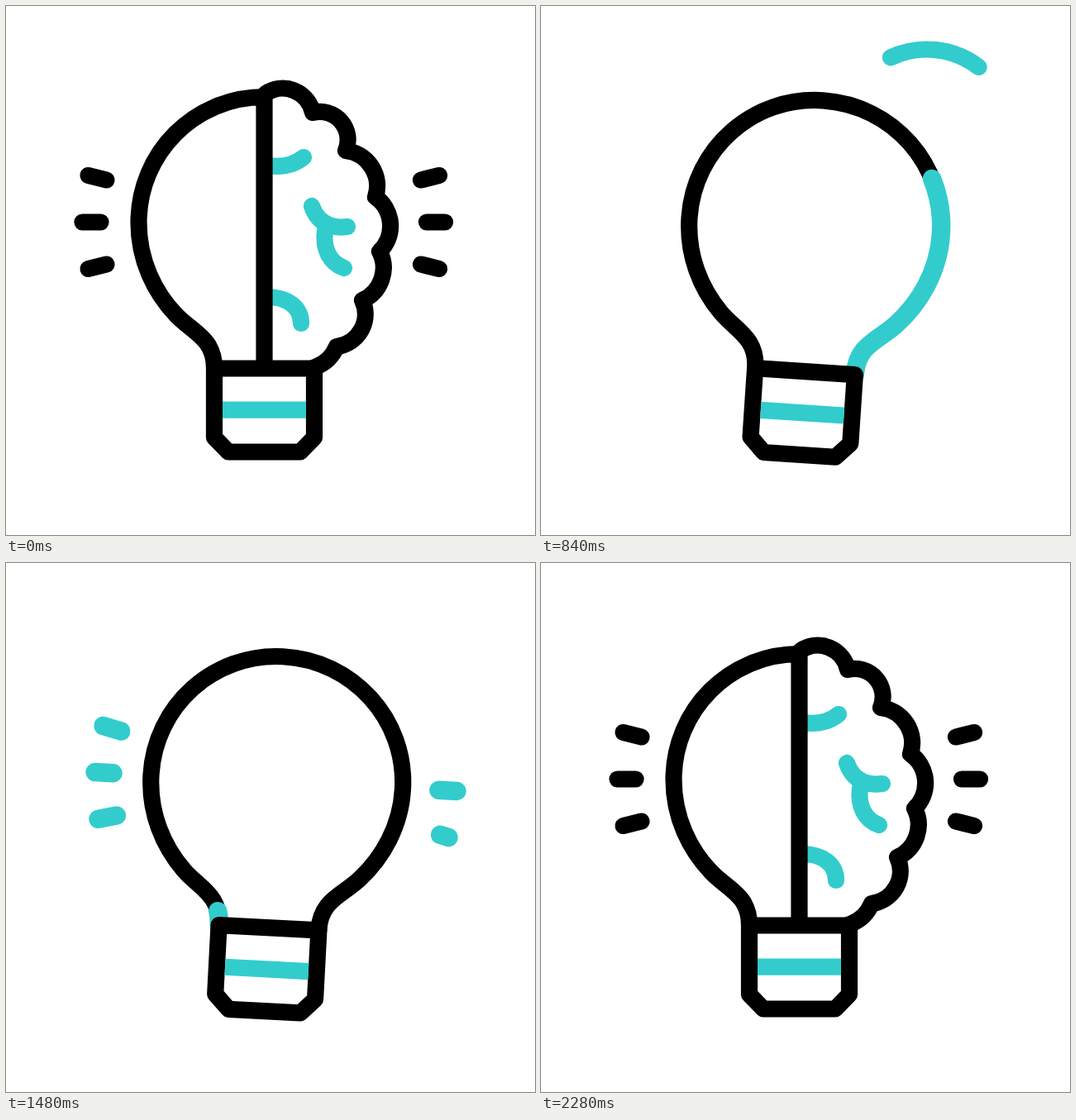
An HTML page for the animation above (2400 ms loop, 640 by 640 pixels).

```html
<!DOCTYPE html>
<html lang="en">
<head>
<meta charset="utf-8">
<title>Bulb and brain</title>
<style>
  html, body { margin: 0; width: 100%; height: 100%; overflow: hidden; background: #fff; }
  svg { display: block; width: 100vw; height: 100vh; }
  path { fill: none; stroke: #000; stroke-width: 20.2; stroke-linecap: round; stroke-linejoin: round; }
  .teal { stroke: #33cccc; }
  .wide { stroke-width: 22.5; }
  .solid { fill: #fff; }
  #brain path { vector-effect: non-scaling-stroke; }
</style>
</head>
<body>
<svg viewBox="0 0 640 640">
  <g id="icon">
    <path class="teal" d="M316 193Q343 197 360 183M370 242C376 260 390 270 413 267"/>
    <g id="brain">
      <path class="teal" d="M386 272C383 294 392 311 409 317M316 352C340 352 357 364 357 384"/>
      <path d="M314 106A37 37 0 0 1 371 129A34 34 0 0 1 411 175A43 43 0 0 1 447 231A43 43 0 0 1 452 297A43 43 0 0 1 431 356A39.5 39.5 0 0 1 400 412A45 45 0 0 1 374 437L355 446"/>
    </g>
    <path id="bulb" class="solid"/>
    <path id="glow" class="teal wide" pathLength="1"/>
    <path class="solid" d="M252 438.5H373V522L356 539.5H269L252 522Z"/>
    <path class="teal" style="stroke-linecap:butt" d="M262 488.7H363"/>
    <path id="arcRight" class="teal" pathLength="1" d="M536.8 180A103.2 103.2 0 0 0 390.5 52.7"/>
    <path id="arcLeft" class="teal" pathLength="1" d="M46.3 162.3A104.5 104.5 0 0 1 226.4 103.7"/>
    <g id="rays"></g>
  </g>
</svg>
<script>
const LOOP = 2400;
const $ = id => document.getElementById(id);
const clamp = x => Math.min(1, Math.max(0, x));
const ramp = (t, from, to) => clamp((t - from) / (to - from));
const ease = x => (1 - Math.cos(Math.PI * x)) / 2;

// Shows only the part of a path between the fractions a and b.
function trim(path, a, b) {
  path.style.display = b > a ? '' : 'none';
  path.setAttribute('stroke-dasharray', `${b - a} 2`);
  path.setAttribute('stroke-dashoffset', -a);
}

// open = 0: straight divider on the right; open = 1: full bulb.
function bulbPath(open) {
  const mid = 312.5;
  const p = (x, yOpen, yShut = yOpen) =>
    `${mid + open * (x - mid)} ${yShut + open * (yOpen - yShut)} `;
  return 'M252 438C252 402 226 395 206 374C180 347 160.5 308 160.5 262C160.5 178 228 110 312.5 110' +
    'C' + p(397, 110, 160) + p(465.5, 178, 211) + p(465.5, 262) +
    'C' + p(465.5, 308) + p(445, 347) + p(419, 374) +
    'C' + p(399, 395) + p(373, 402) + p(373, 438);
}

// Each ray runs from its inner end to its outer end.
const rightRays = [[502, 210.5, 524, 205], [502, 312.5, 524, 318], [509, 261.5, 531, 261.5]];
const mirror = ([x1, y1, x2, y2]) => [623.5 - x1, y1, 623.5 - x2, y2];
const rayLines = [...rightRays, ...rightRays.map(mirror)];

function addRay([x1, y1, x2, y2], className) {
  const ray = document.createElementNS('http://www.w3.org/2000/svg', 'path');
  ray.setAttribute('d', `M${x1} ${y1}L${x2} ${y2}`);
  ray.setAttribute('pathLength', 1);
  ray.setAttribute('class', className);
  $('rays').append(ray);
  return ray;
}
const blackRays = rayLines.map(line => addRay(line, ''));
const tealRays = rayLines.map(line => addRay(line, 'teal wide'));

// Tilt keys: [time in ms, angle in degrees].
const swing = [[200, 0], [481, -6], [762, 6], [1043, -6], [1324, 6], [1638, 0]];
function tilt(t) {
  let angle = 0;
  for (let i = 1; i < swing.length; i++) {
    const [from, a] = swing[i - 1], [to, b] = swing[i];
    angle += (b - a) * ease(ramp(t, from, to));
  }
  return angle;
}

function draw(t) {
  $('icon').setAttribute('transform', `rotate(${tilt(t)} 262 545)`);

  const open = ease(ramp(t, 200, 520)) - ease(ramp(t, 1590, 1910));
  $('bulb').setAttribute('d', bulbPath(open));
  $('brain').setAttribute('transform',
    `translate(392 265) scale(${1 - 0.27 * open}) translate(-392 -265)`);

  trim($('glow'), 1 - ramp(t, 720, 1112), 1 - ramp(t, 1105, 1488));
  trim($('arcRight'), ramp(t, 645, 1000), ramp(t, 230, 645));
  trim($('arcLeft'), ramp(t, 1800, 2180), ramp(t, 1485, 1780));

  const returning = t > 1500;
  for (const ray of blackRays)
    trim(ray, returning ? 0 : ramp(t, 520, 770), returning ? ramp(t, 1980, 2280) : 1);

  const head = 6 * ramp(t, 1098, 1265), tail = 6 * ramp(t, 1400, 1720);
  tealRays.forEach((ray, i) => trim(ray, clamp(tail - i), clamp(head - i)));
}

$('glow').setAttribute('d', bulbPath(1));
const start = performance.now();
function frame() {
  draw((performance.now() - start) % LOOP);
  requestAnimationFrame(frame);
}
frame();
</script>
</body>
</html>
```
